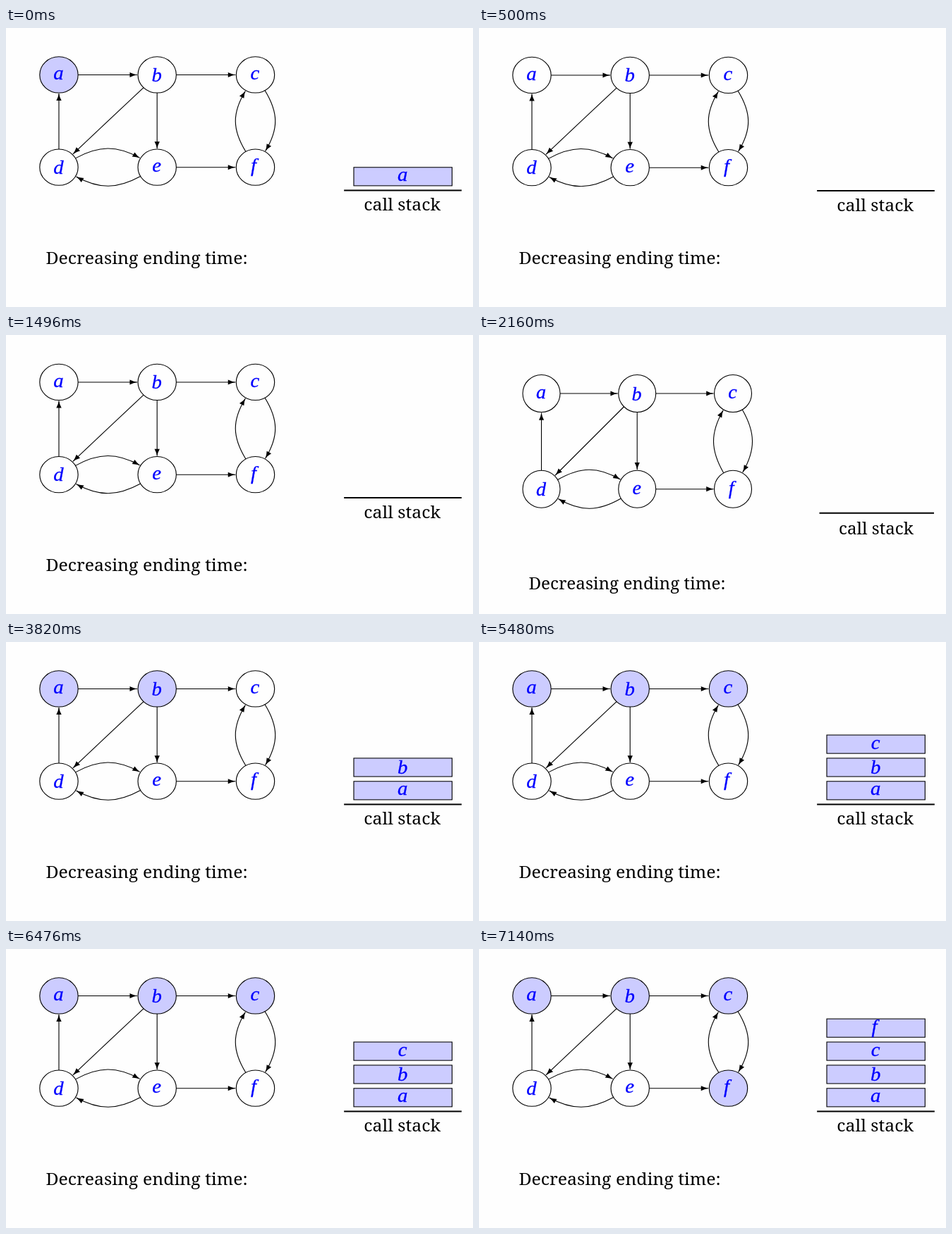
Write an HTML page that moves like this. It is 662 px wide and 396 px high and loops after 8 s.

```html
<!DOCTYPE html>
<html lang="en">
<head>
<meta charset="utf-8">
<title>Depth-first search call stack</title>
<style>
  html, body { margin: 0; width: 100%; height: 100%; overflow: hidden; background: #fefefe; }
  svg { display: block; width: 662px; height: 396px; }
  text { font: 24.2px "Noto Serif", serif; }
  .letter {
    font: italic 28px "Liberation Serif", "Times New Roman", serif;
    fill: #00f; stroke: #00f; stroke-width: .3; text-anchor: middle;
  }
  .shape { fill: #fefefe; stroke: #000; stroke-width: 1.1; }
  .edge { fill: none; stroke: #000; stroke-width: 1.1; }
  .on { fill: #ccf; }
</style>
</head>
<body>
<svg viewBox="0 0 662 396">
  <defs>
    <marker id="head" markerUnits="userSpaceOnUse" markerWidth="12" markerHeight="10"
            viewBox="-11 -5 12 10" refX="0" refY="0" orient="auto">
      <path d="M0 0Q-5 -.9 -10.3 -3.6V3.6Q-5 .9 0 0"/>
    </marker>
  </defs>
  <g id="scene">
    <path d="M482.5 252.7H645" stroke="#000" stroke-width="2"/>
    <text x="510" y="282.5">call stack</text>
    <text x="70.5" y="360.5">Decreasing ending time:</text>
  </g>
</svg>
<script>
const scene = document.getElementById('scene');
const R = 26.5;
const nodes = {
  a: [88.5, 83], b: [224.2, 83], c: [360, 83],
  d: [88.5, 218.7], e: [224.2, 218.7], f: [360, 218.7]
};
// start, end and bend angle in degrees
const edges = [
  ['a', 'b', 0], ['b', 'c', 0], ['b', 'd', 0], ['b', 'e', 0], ['d', 'a', 0], ['e', 'f', 0],
  ['d', 'e', 30], ['e', 'd', 30], ['c', 'f', 30], ['f', 'c', 30]
];
const plain = '';
const wide = 'matrix(1.0258 0 0 .967 -15.8 -13.3)';
const raised = 'matrix(1.0258 0 0 .967 -15.8 -13.8)';
// start time, active calls, view
const steps = [
  [0, 'a', raised], [500, '', wide], [2160, '', plain],
  [3820, 'ab', raised], [5480, 'abc', raised], [7140, 'abcf', raised]
];

function add(tag, attrs, parent = scene) {
  const el = document.createElementNS('http://www.w3.org/2000/svg', tag);
  for (const key in attrs) el.setAttribute(key, attrs[key]);
  return parent.appendChild(el);
}

function letter(name, x, y, parent) {
  const drop = 'bd'.includes(name) ? 9.5 : 6.8;
  const shift = name === 'f' ? 2.3 : 0.6;
  add('text', { class: 'letter', x: x - shift, y: y + drop }, parent).textContent = name;
}

function edge(from, to, bend) {
  const [x1, y1] = nodes[from], [x2, y2] = nodes[to];
  const dir = Math.atan2(y2 - y1, x2 - x1), turn = bend * Math.PI / 180;
  const out = dir - turn, back = dir + Math.PI + turn;
  const polar = (x, y, r, angle) => [x + r * Math.cos(angle), y + r * Math.sin(angle)];
  const start = polar(x1, y1, R, out), end = polar(x2, y2, R + 1, back);
  const pull = 0.42 * Math.hypot(end[0] - start[0], end[1] - start[1]);
  const d = `M${start}C${polar(...start, pull, out)} ${polar(...end, pull, back)} ${end}`;
  add('path', { class: 'edge', d, 'marker-end': 'url(#head)' });
}

const circles = {};
for (const name in nodes) {
  const [cx, cy] = nodes[name];
  circles[name] = add('circle', { class: 'shape', cx, cy, r: R });
  letter(name, cx, cy);
}
edges.forEach(e => edge(...e));

const calls = [...'abcf'].map((name, i) => {
  const group = add('g', {}), y = 218.8 - 34 * i;
  add('rect', { class: 'shape on', x: 496, y, width: 135.8, height: 27 }, group);
  letter(name, 564, y + 13.5, group);
  return group;
});

function draw(now) {
  const t = now % 8000;
  const [, active, view] = steps.filter(s => s[0] <= t).pop();
  scene.setAttribute('transform', view);
  for (const name in circles) circles[name].classList.toggle('on', active.includes(name));
  calls.forEach((call, i) => call.setAttribute('visibility', i < active.length ? 'visible' : 'hidden'));
}

const begin = performance.now();
function tick() {
  draw(performance.now() - begin);
  requestAnimationFrame(tick);
}
tick();
</script>
</body>
</html>
```
